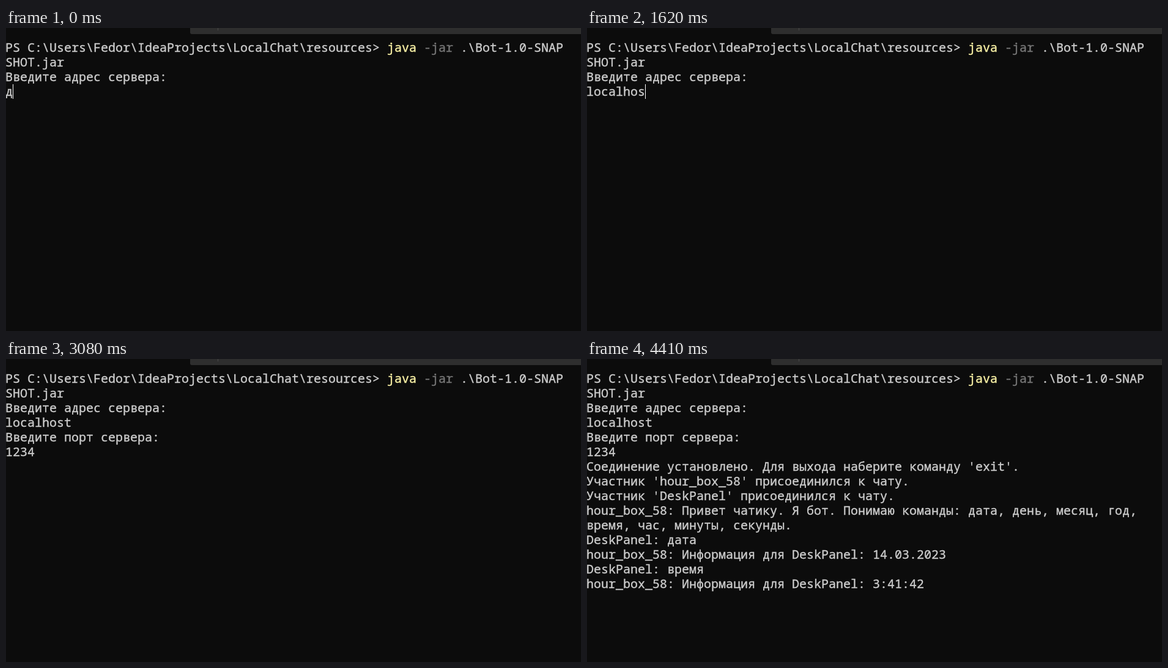
An HTML page for the animation above (5010 ms loop, 940 by 496 pixels).

```html
<!DOCTYPE html>
<html lang="ru">
<head>
<meta charset="utf-8">
<title>Terminal</title>
<style>
  html, body { margin: 0; width: 100%; height: 100%; overflow: hidden; background: #0c0c0c; }
  svg { display: block; width: 940px; height: 496px; }
  text {
    font: 20px "Noto Sans Mono", "DejaVu Sans Mono", monospace;
    font-variant-ligatures: none;
    white-space: pre;
    color: #ccc;
    fill: currentColor;
    stroke: currentColor;
    stroke-width: .4px;
  }
  .cmd { color: #f9f1a5; }
  .flag { color: #767676; }
</style>
</head>
<body>
<svg viewBox="0 0 940 496">
  <path d="M301 0H940V10H304Q301 10 301 7Z" fill="#2e2e2e"/>
  <rect x="346" width="1" height="4" fill="#484848"/>
  <g id="screen"></g>
  <rect id="caret" width="1" height="24" fill="#fff"/>
</svg>
<script>
const LOOP = 5010, CELL = 12, ROW = 24, LEFT = -1, TOP = 20, BASE = 19;
const screen = document.getElementById('screen');
const caret = document.getElementById('caret');

function addText(row, col, str, cls = '') {
  const el = document.createElementNS('http://www.w3.org/2000/svg', 'text');
  el.setAttribute('x', LEFT + col * CELL);
  el.setAttribute('y', TOP + row * ROW + BASE);
  el.setAttribute('class', cls);
  el.textContent = str;
  screen.append(el);
  return el;
}

const prompt = 'PS C:\\Users\\Fedor\\IdeaProjects\\LocalChat\\resources> ';
addText(0, 0, prompt);
addText(0, prompt.length, 'java', 'cmd');
addText(0, prompt.length + 5, '-jar', 'flag');
addText(0, prompt.length + 10, '.\\Bot-1.0-SNAP');
addText(1, 0, 'SHOT.jar');
addText(2, 0, 'Введите адрес сервера:');

// Typed input: row, then [time, text, caret shown]
const inputs = [
  { row: 3, steps: [
    [0, 'д', 1], [210, '', 1], [340, 'loc', 1], [480, 'loca', 1], [550, 'local', 1],
    [1140, 'local', 0], [1350, 'localh', 1], [1480, 'localho', 1],
    [1620, 'localhos', 1], [1750, 'localhost', 1], [1880, 'localhost', 0]
  ] },
  { row: 5, steps: [
    [0, '', 0], [2350, '1', 1], [2410, '12', 1], [2480, '123', 1],
    [2680, '1234', 1], [3080, '1234', 0]
  ] }
];
for (const input of inputs) input.el = addText(input.row, 0, '');

const bot = 'hour_box_58', user = 'DeskPanel';
// Printed output: time, first row, lines
const output = [
  [1880, 4, ['Введите порт сервера:']],
  [3150, 6, [
    "Соединение установлено. Для выхода наберите команду 'exit'.",
    `Участник '${bot}' присоединился к чату.`,
    `Участник '${user}' присоединился к чату.`,
    `${bot}: Привет чатику. Я бот. Понимаю команды: дата, день, месяц, год,`,
    'время, час, минуты, секунды.'
  ]],
  [3740, 11, [`${user}: дата`, `${bot}: Информация для ${user}: 14.03.2023`]],
  [4410, 13, [`${user}: время`, `${bot}: Информация для ${user}: 3:41:42`]]
].flatMap(([at, row, lines]) =>
  lines.map((line, i) => ({ at, el: addText(row + i, 0, line) })));

function draw(t) {
  let caretOn = false;
  for (const { row, steps, el } of inputs) {
    const [, str, on] = steps.findLast(step => step[0] <= t);
    if (el.textContent !== str) el.textContent = str;
    if (on) {
      caretOn = true;
      caret.setAttribute('x', Math.max(0, LEFT + str.length * CELL));
      caret.setAttribute('y', TOP + row * ROW);
    }
  }
  caret.style.visibility = caretOn ? 'visible' : 'hidden';
  for (const { at, el } of output) el.style.visibility = t >= at ? 'visible' : 'hidden';
}

const start = performance.now();
function tick() {
  draw((performance.now() - start) % LOOP);
  requestAnimationFrame(tick);
}
tick();
</script>
</body>
</html>
```
